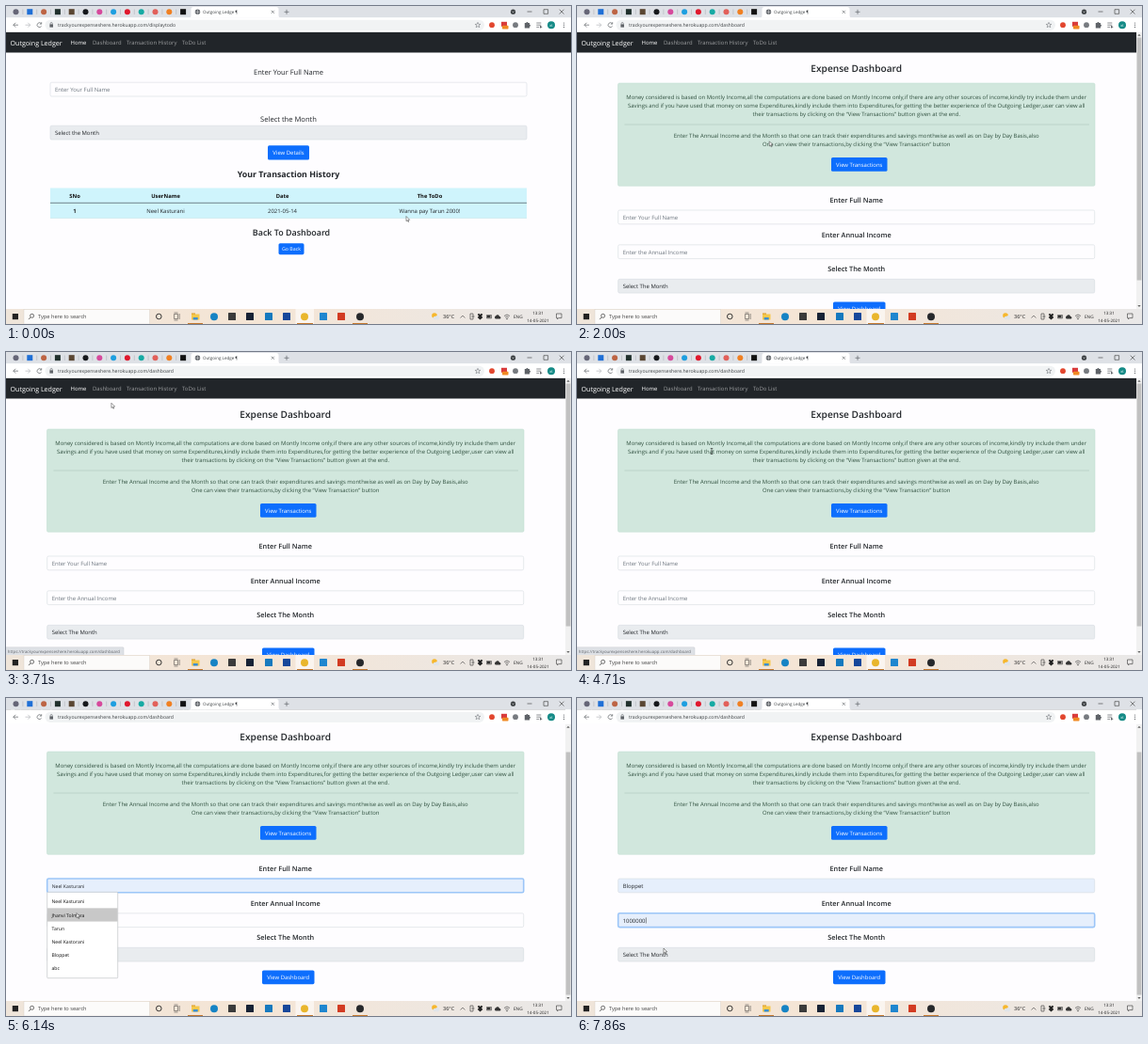
An HTML page for the animation above (8000 ms loop, 600 px wide and 338 px high).

```html
<!DOCTYPE html>
<html lang="en">
<head>
<meta charset="utf-8">
<title>Outgoing Ledger</title>
<style>
html, body { margin: 0; height: 100%; overflow: hidden; background: #fff; }
svg { display: block; width: 100vw; height: 100vh; }
text { font-family: "Open Sans", "Noto Sans", sans-serif; white-space: pre; text-rendering: geometricPrecision; }
</style>
</head>
<body>
<svg id="stage" viewBox="0 0 600 338"></svg>
<script>
const LOOP = 8000, FPS = 7;
const INK = '#212529', BLUE = '#0d6efd', GREY = '#6c757d', PAPER = '#fefdff', AUTOFILL = '#e6effc';
const HOST = 'trackyourexpenseshere.herokuapp.com';
const PEOPLE = ['Neel Kasturani', 'Jhanvi Tolmera', 'Tarun', 'Neel Kastorani', 'Bloppet', 'abc'];

// y is the middle of the capitals
const text = (x, y, str, size = 5.95, fill = INK, weight = 400, anchor = 'start', id = '') =>
  `<text id="${id}" x="${x}" y="${y + size * .36}" font-size="${size}" fill="${fill}" font-weight="${weight}" text-anchor="${anchor}">${str}</text>`;
const mid = (x, y, str, size, fill, weight) => text(x, y, str, size, fill, weight, 'middle');
const rect = (x, y, w, h, fill, extra = '') =>
  `<rect x="${x}" y="${y}" width="${w}" height="${h}" fill="${fill}" ${extra}/>`;
const disc = (x, y, r, fill, extra = '') => `<circle cx="${x}" cy="${y}" r="${r}" fill="${fill}" ${extra}/>`;
const line = (d, stroke = '#5f6368', width = .7, extra = '') =>
  `<path d="${d}" fill="none" stroke="${stroke}" stroke-width="${width}" ${extra}/>`;
const group = (id, body, extra = '') => `<g id="${id}" ${extra}>${body}</g>`;
const field = (x, y, fill = PAPER, id = '') =>
  rect(x, y, 506, 14.8, fill, `id="${id}" rx="1.6" stroke="#ced4da" stroke-width=".5"`);
const button = (x, y, w, h, label, size = 5.95, id = '') =>
  rect(x, y, w, h, BLUE, `id="${id}" rx="1.6"`) + mid(x + w / 2, y + h / 2, label, size, '#fff');

function navbar(width) {
  return rect(0, 27.5, width, 22, INK) + text(4.5, 39.3, 'Outgoing Ledger', 7.1, '#fff') +
    text(68.5, 39.3, 'Home', 5.95, '#fff') + text(187, 39.3, 'ToDo List', 5.95, '#9b9d9f') +
    text(128, 39.3, 'Transaction History', 5.95, '#9b9d9f');
}

function todoPage() {
  const columns = [[73, 'SNo', '1'], [169.5, 'UserName', PEOPLE[0]],
    [293.5, 'Date', '2021-05-14'], [450, 'The ToDo', `Wanna pay ${PEOPLE[2]} 2000!`]];
  return navbar(600) + text(92, 39.3, 'Dashboard', 5.95, '#9b9d9f') +
    mid(300, 70.3, 'Enter Your Full Name', 7.5) +
    field(47, 81.2) + text(52, 88.8, 'Enter Your Full Name', 5.95, GREY) +
    mid(300, 119.8, 'Select the Month', 7.6) +
    field(47, 127.2, '#e9ecef') + text(52, 134.8, 'Select the Month') +
    button(278, 148.3, 44, 15.2, 'View Details') +
    mid(300, 179, 'Your Transaction History', 8.8, INK, 700) +
    rect(47, 193.5, 506, 32, '#cff4fc') + line('M47 209.3H553', '#30383b', .6) + line('M47 225.4H553', '#badce3', .5) +
    columns.map(([x, head, cell], i) =>
      mid(x, 201.5, head, 5.8, '#111', 700) + mid(x, 217.5, cell, 5.95, INK, i ? 400 : 700)).join('') +
    mid(303, 240.8, 'Back To Dashboard', 8.95, INK, 600) +
    button(289.5, 252.2, 27, 12, 'Go Back', 5.3, 'goBack');
}

function dashboardPage() {
  const notes = [
    [96.5, 'Money considered is based on Montly Income,all the computations are done based on Montly Income only,if there are any other sources of income,kindly try include them under'],
    [105.9, 'Savings and if you have used that money on some Expenditures,kindly include them into Expenditures,for getting the better experience of the Outgoing Ledger,user can view all'],
    [115.3, 'their transactions by clicking on the “View Transactions” button given at the end.'],
    [137.9, 'Enter The Annual Income and the Month so that one can track their expenditures and savings monthwise as well as on Day by Day Basis,also'],
    [147.2, 'One can view their transactions,by clicking the “View Transaction” button']];
  return navbar(594) + text(92, 39.3, 'Dashboard', 5.95, '#9b9d9f', 400, 'start', 'dashLink') +
    mid(296.7, 66.3, 'Expense Dashboard', 10.15, INK, 600) +
    rect(43.5, 82, 506.5, 109.3, '#d1e7dd', 'rx="1.6" stroke="#badbcc" stroke-width=".5"') +
    notes.map(([y, str]) => mid(296.7, y, str, 5.95, '#30503f')).join('') +
    line('M50.5 126H544', '#a0bfb1', .5) +
    button(270, 161, 59.5, 14.8, 'View Transactions') +
    mid(296.7, 206.2, 'Enter Full Name', 7.3, INK, 600) +
    field(43.7, 217, PAPER, 'nameBox') + text(48.7, 224.6, '', 5.95, INK, 400, 'start', 'nameText') +
    mid(296.7, 243, 'Enter Annual Income', 7.3, INK, 600) +
    field(43.7, 253.8, PAPER, 'incomeBox') + text(48.7, 261.4, '', 5.95, INK, 400, 'start', 'incomeText') +
    line('M73.3 258.3v6.2', '#111', .5, 'id="caret"') +
    mid(296.7, 279.6, 'Select The Month', 7.3, INK, 600) +
    field(43.7, 290.3, '#e9ecef') + text(48.7, 297.8, 'Select The Month') +
    button(272, 314.4, 55.5, 14.8, 'View Dashboard');
}

function dropdown(id, y, items) {
  return group(id,
    rect(43.7, y, 75, items.length * 14.15 + 6.5, '#fff', 'rx=".8" stroke="#b9bcc0" stroke-width=".6"') +
    rect(43.9, 0, 74.6, 14.2, '#c8c8c8', `id="${id}Hover"`) +
    items.map((str, i) => text(48.5, y + 10.3 + i * 14.15, str, 5.1, '#111')).join(''));
}

function browserTop() {
  const tabs = ['#667', '#1f6fd6', '#bd6444', '#20302c', '#5a4632', '#16181c', '#d64a9c',
    '#1e9fe0', '#e0182d', '#16aaa3', '#e2605a', '#f08022', '#111'];
  const tools = [[516, '#e2472f'], [541, '#777b80'], [579, '#148a86']];
  return rect(0, 0, 600, 12.5, '#dee1e6') + rect(0, 12.3, 600, 15.4, '#fff') +
    `<path d="M194 12.5q2.5 0 2.5-2.5V3.5q0-2.5 2.5-2.5H287q2.5 0 2.5 2.5V10q0 2.5 2.5 2.5Z" fill="#fff"/>` +
    tabs.map((fill, i) => {
      const x = 10.5 + i * 14.8;
      const icon = [1, 3, 4, 12].includes(i) ? rect(x - 3, 3.2, 6, 6, fill) : disc(x, 6.2, 3, fill);
      return icon + (i < 12 ? line(`M${x + 7.4} 3.5v5.5`, '#9a9da2', .4) : '');
    }).join('') +
    disc(203.5, 6.3, 2.7, '#5f6368') + line('M201 6.3h5M203.5 3.8v5', '#fff', .4) +
    text(209, 6.3, 'Outgoing Ledge ¶', 4.5, '#3c4043') +
    line('M281.8 4.8l3 3m0-3l-3 3M295.5 6.3h5M298 3.8v5') +
    disc(538.5, 6.2, 2.6, '#3c4043') + line('M537.3 5.6l1.2 1.2 1.2-1.2', '#fff', .6) +
    line('M553.5 6h5M571 3.7h4.6v4.6H571ZM587.7 3.7l4.8 4.8m0-4.8l-4.8 4.8', '#333', .6) +
    rect(41.5, 14.7, 466.5, 11.2, '#f1f3f4', 'rx="5.6"') +
    line('M13 20.2H7.8m2.4-2.4l-2.4 2.4 2.4 2.4M37.4 18.7a2.4 2.4 0 1 0 .2 2.6M37.7 17.2v1.9h-1.9') +
    line('M20.5 20.2h5.2m-2.4-2.4l2.4 2.4-2.4 2.4', '#b3b6ba') +
    rect(46.4, 19.4, 3.6, 3.2, '#5f6368') + line('M47.1 19.6v-1a1.1 1.1 0 0 1 2.2 0v1', '#5f6368', .6) +
    text(55, 20.3, '', 5.15, '#3c4043', 400, 'start', 'url') +
    line('M501 17.4l.8 1.9 2 .1-1.6 1.3.6 2-1.8-1.1-1.8 1.1.6-2-1.6-1.3 2-.1Z', '#5f6368', .5) +
    tools.map(([x, fill]) => disc(x, 20.2, x > 570 ? 4 : 2.9, fill)).join('') +
    rect(526, 16.8, 6, 5, '#d93b3b') + rect(527, 20.8, 6.5, 3.6, '#f08a24', 'rx=".6"') +
    `<path d="M550.8 18h1.6a1 1 0 0 1 2 0h1.6v1.7a1 1 0 0 1 0 2v1.7h-5.2Z" fill="#5f6368"/>` +
    line('M563.3 18h5M563.3 20.2h5M563.3 22.4h2.8') + `<path d="M567 20.8l2.6 1.5-2.6 1.5Z" fill="#5f6368"/>` +
    mid(579, 20.2, 'xt', 4, '#fff') +
    [18, 20.2, 22.4].map(y => disc(592.5, y, .6, '#5f6368')).join('');
}

function taskbar() {
  const apps = [[221, '#1683c4'], [317, '#e9b62c'], [376, '#26282b']];
  const tiles = [[240, '#3b3b3b'], [259, '#172235'], [279, '#1679be'], [298, '#17479a'], [337, '#1f86cf'], [356, '#d23b22']];
  return `<linearGradient id="sand"><stop stop-color="#efe5da"/><stop offset=".45" stop-color="#f5e5d5"/><stop offset="1" stop-color="#e9e8e8"/></linearGradient>` +
    rect(0, 322, 600, 16, 'url(#sand)') + rect(6.8, 327, 6.2, 6.2, '#222') +
    rect(19, 322.6, 133.5, 15.4, '#fcfbfa', 'stroke="#d4ccc4" stroke-width=".4"') +
    disc(27.6, 329.3, 2, 'none', 'stroke="#333" stroke-width=".7"') + line('M26.2 330.8l-2.2 2.3', '#333') +
    text(34, 330, 'Type here to search', 5.65, '#444') +
    disc(162.3, 330, 2.8, 'none', 'stroke="#222" stroke-width=".9"') +
    line('M178.5 327.5h4v5h-4ZM184.2 327v6M178.5 326h4M178.5 334h4', '#333', .5) +
    rect(307.5, 322, 19.5, 16, '#fff', 'opacity=".6"') +
    rect(197, 326.5, 4, 3, '#d99a22') + rect(197, 327.5, 8.5, 6, '#f6c84c') + rect(198.7, 331, 5, 2.5, '#3c8fd0') +
    apps.map(([x, fill]) => disc(x, 330.2, 4, fill)).join('') +
    tiles.map(([x, fill]) => rect(x - 4, 326, 8, 8, fill, 'rx=".6"')).join('') +
    [[193, 16], [309, 17], [368, 16]].map(([x, w]) => rect(x, 337, w, 1, '#c4792f')).join('') +
    disc(455, 329, 2.8, '#f6b72c') + disc(455.5, 331.6, 1.8, '#dfe4ea') + disc(458, 331.2, 2.2, '#dfe4ea') +
    text(464, 330, '36°C', 5.5, '#222') +
    line('M482.6 331.5l2.4-2.4 2.4 2.4M493 327h3v6h-3ZM494.5 330h3M510.5 328.5h5v3.4h-5Z', '#333', .6) +
    `<path d="M500.7 328l1.4-1.2 1.4 1.2 1.4-1.2 1.4 1.2-1.4 1.6 1.4 1.4-2.8 2.5-2.8-2.5 1.4-1.4Z" fill="#222"/>` +
    rect(511, 329, 3.5, 2.4, '#333') +
    `<path d="M519.8 332.4a1.7 1.7 0 0 1 .5-3.1 2 2 0 0 1 3.7.6 1.3 1.3 0 0 1 .6 2.5Z" fill="#333"/>` +
    line('M529 329.5q3-3 6 0M530.2 331q1.8-1.8 3.6 0', '#333', .6) + disc(532, 332.5, .7, '#333') +
    text(539, 330, 'ENG', 4.7, '#222') + mid(565, 326.3, '13:31', 4.5, '#222') + mid(565, 333.9, '14-05-2021', 4.5, '#222') +
    line('M584.5 327h5.5v4.6h-3.4l-1 1.3v-1.3h-1.1Z', '#333', .6);
}

const scrollbar = rect(594, 27.5, 6, 294.5, '#f1f1f1') +
  rect(594.6, 33.5, 4.8, 258, '#c1c1c1', 'id="thumb"') +
  '<path d="M595.3 31.7h3.4l-1.7-1.9ZM595.3 318h3.4l-1.7 1.9Z" fill="#666"/>';

const pointers = {
  arrow: '<path d="M0 0V5.2L1.2 4.2 2 6 2.8 5.7 2 3.8H3.7Z" fill="#fff" stroke="#222" stroke-width=".45"/>',
  hand: '<path d="M-.7.5Q0-.5.7.5V2.7L3.3 3.3Q4 3.5 4 4.3L3.4 7.3H-.6L-2.4 4.4Q-2 3.6-.7 4.5Z" fill="#fff" stroke="#111" stroke-width=".5"/>',
  beam: line('M-1.3-3H1.3M0-3V3M-1.3 3H1.3', '#222', .6)
};

document.getElementById('stage').innerHTML =
  rect(0, 0, 600, 338, PAPER) + group('todo', todoPage()) +
  group('dashboard', group('sheet', dashboardPage()) + scrollbar +
    dropdown('people', 206.3, PEOPLE) + dropdown('incomes', 243.2, ['1000000'])) +
  group('status', rect(-1, 313.8, 126, 9, '#dee1e6', 'rx="1" stroke="#c3c6ca" stroke-width=".4"') +
    text(1.8, 318, `https://${HOST}/dashboard`, 4.37, '#5f6368')) +
  browserTop() + taskbar() +
  group('pointer', Object.entries(pointers).map(([id, body]) => group(id, body)).join(''));

const $ = Object.fromEntries([...document.querySelectorAll('[id]')].map(el => [el.id, el]));
const show = (el, on) => el.setAttribute('display', on ? 'inline' : 'none');
const clamp = v => Math.min(1, Math.max(0, v));

// step, x, y, pointer shape from this step on
const track = [
  [0, 425, 223.5, 'arrow'], [1, 425, 223.5, 'arrow'], [8, 311, 257, 'hand'], [10, 311, 257, 'arrow'],
  [18, 97.5, 30.5, 'hand'], [23, 97.5, 30.5, 'arrow'], [31, 143, 105.5, 'beam'], [34, 143, 105.5, 'arrow'],
  [37, 119.7, 186.7, 'arrow'], [39, 108, 199, 'beam'], [41, 100, 200, 'arrow'], [43, 75, 228.5, 'arrow'],
  [45, 78, 271, 'arrow'], [46, 78, 271, 'arrow'], [48, 88, 236, 'beam'], [50, 88, 237, 'arrow'],
  [52, 90, 252, 'arrow'], [53, 90, 252, 'arrow'], [55, 92, 266, 'arrow']];

function movePointer(step) {
  const i = track.findLastIndex(key => key[0] <= step);
  const [start, x, y, shape] = track[i], [end, x2, y2] = track[i + 1] || [start + 1, x, y];
  const p = (step - start) / (end - start), e = p * p * (3 - 2 * p);
  const py = y + (y2 - y) * e;
  $.pointer.setAttribute('transform', `translate(${x + (x2 - x) * e} ${py})`);
  for (const id in pointers) show($[id], id === shape);
  return py;
}

function setField(name, value, hint, filled, focused) {
  const box = $[name + 'Box'], label = $[name + 'Text'];
  box.setAttribute('fill', filled ? AUTOFILL : PAPER);
  box.setAttribute('stroke', focused ? '#9cc6f8' : '#ced4da');
  box.setAttribute('stroke-width', focused ? 1.6 : .5);
  label.textContent = value || hint;
  label.setAttribute('fill', value ? INK : GREY);
}

function render(ms) {
  const step = Math.floor(ms * FPS / 1000 + .04);
  const y = movePointer(step);
  const onDashboard = step >= 11;
  show($.todo, !onDashboard);
  show($.dashboard, onDashboard);
  $.url.textContent = `${HOST}/${onDashboard ? 'dashboard' : 'displaytodo'}`;
  $.goBack.setAttribute('fill', step >= 8 ? '#0b5ed7' : BLUE);
  $.dashLink.setAttribute('fill', step >= 18 && step < 24 ? '#c4c5c6' : '#9b9d9f');
  $.status.setAttribute('opacity', step < 36 ? clamp((step - 18) / 2) : 0);

  const scroll = clamp((step - 33) / 3);
  $.sheet.setAttribute('transform', `translate(0 ${-25 * scroll})`);
  $.thumb.setAttribute('y', 33.5 + 24 * scroll);

  const choosing = step >= 41 && step < 46;
  const row = Math.floor((y - 209.2) / 14.15);
  show($.people, choosing);
  show($.peopleHover, row >= 0);
  $.peopleHover.setAttribute('y', 209.2 + row * 14.15);
  // the preview trails the highlighted row by one
  const preview = choosing && row >= 0 ? PEOPLE[Math.max(0, row - 1)] : '';
  const name = step >= 46 ? PEOPLE[4] : preview;
  setField('name', name, 'Enter Your Full Name', name, step >= 40 && step < 49);
  $.nameText.setAttribute('font-size', preview ? 5.1 : 5.95);

  const picked = step >= 53;
  show($.incomes, step >= 50 && !picked);
  show($.incomesHover, step >= 52);
  $.incomesHover.setAttribute('y', 246.3);
  setField('income', picked ? '1000000' : '', 'Enter the Annual Income', picked, step >= 49);
  show($.caret, picked);
}

function tick() {
  render(performance.now() % LOOP);
  requestAnimationFrame(tick);
}
tick();
</script>
</body>
</html>
```
